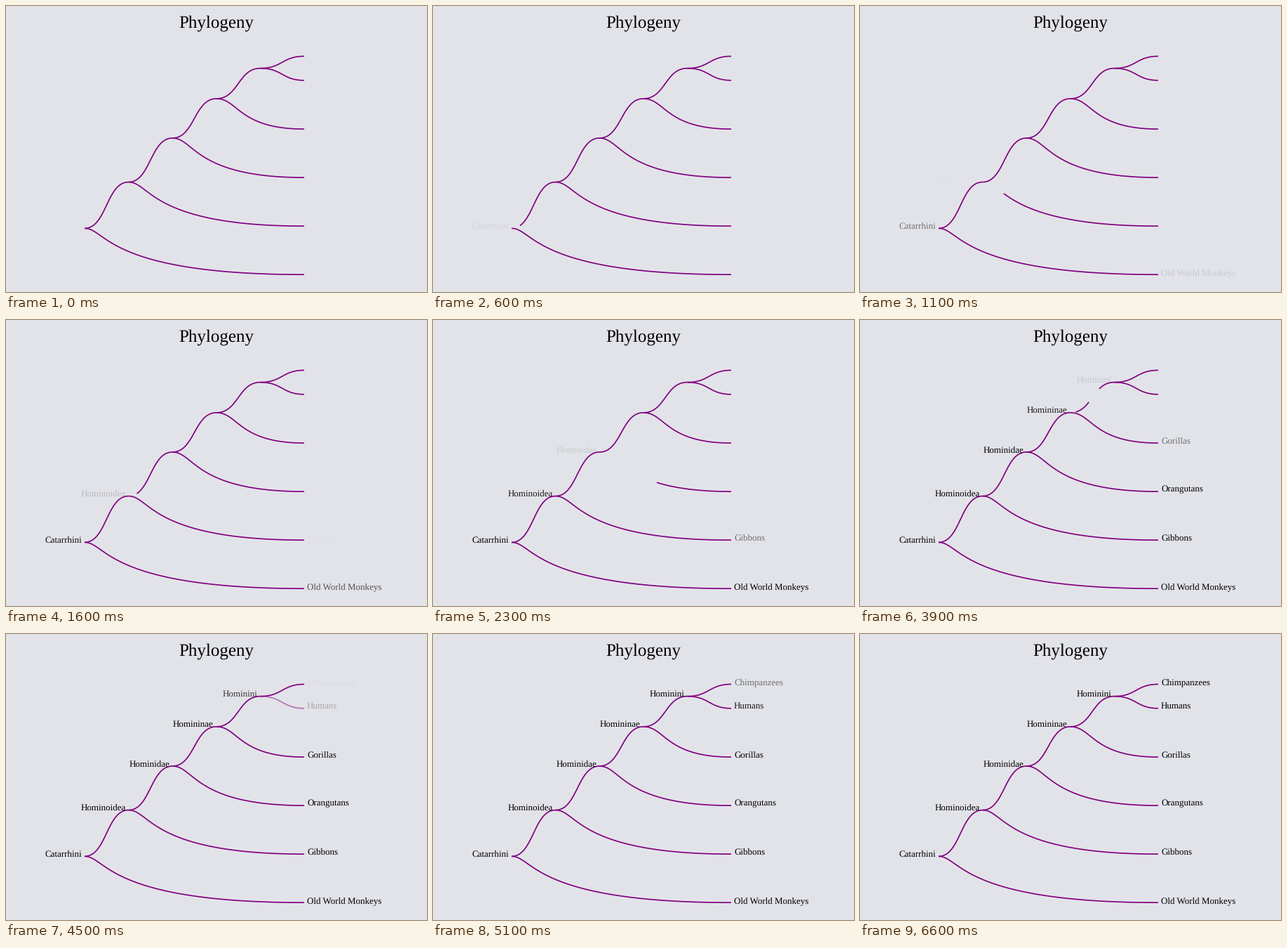
Recreate the animation shown at these times as a matplotlib script. Size 600x407 px, loop 6.7 s.

```python
import numpy as np
import matplotlib.pyplot as plt
from matplotlib.animation import FuncAnimation

W, H, DPI = 600, 407, 100
PX = 72 / DPI                       # points per pixel
STEP, FRAMES = 100, 67              # ms per frame, frames per loop
LINK_TIME = 500                     # each link redraws in turn
FADE_START, FADE_GAP, FADE_TIME = 100, 400, 2000
LEVEL = 62.6                        # horizontal distance between levels

plt.rcParams.update({
    "font.family": "Liberation Serif",
    "text.hinting": "none",
    "lines.scale_dashes": False,
    "path.simplify": False,
})

CLADES = ["Catarrhini", "Hominoidea", "Hominidae", "Homininae", "Hominini"]
TIPS = ["Old World Monkeys", "Gibbons", "Orangutans", "Gorillas", "Humans",
        "Chimpanzees"]
TIP_X = 425
TIP_Y = [382.2, 313.2, 244.1, 175.1, 105.8, 71.5]


def cubic_in_out(p):
    p = np.clip(p, 0, 1)
    return 4 * p**3 if p < 0.5 else 1 - 4 * (1 - p)**3


def link_points(parent, child):
    """Bezier from child to parent, both handles half a level past the parent."""
    t = np.linspace(1, 0, 160)
    (x0, y0), (x1, y1) = parent, child
    x = x0 + 1.5 * LEVEL * t * (1 - t) + (x1 - x0) * t**3
    y = y0 + (y1 - y0) * t**2 * (3 - 2 * t)
    return x, y


# Each clade sits halfway between its own tip and the next clade.
clade_y = [TIP_Y[-1]]
for y in TIP_Y[-2::-1]:
    clade_y.insert(0, (clade_y[0] + y) / 2)
inner = [(112 + LEVEL * k, clade_y[k]) for k in range(len(CLADES))]
tips = [(TIP_X, y) for y in TIP_Y]

fig = plt.figure(figsize=(W / DPI, H / DPI), dpi=DPI, facecolor="#e2e3e8")
ax = fig.add_axes([0, 0, 1, 1])
ax.set_xlim(0, W)
ax.set_ylim(H, 0)
ax.axis("off")

ax.text(300, 31, "Phylogeny", size=25 * PX, ha="center", va="baseline")

links, labels = [], []


def add_link(parent, child):
    x, y = link_points(parent, child)
    line, = ax.plot(x, y, color="#800080", lw=1.7 * PX,
                    solid_capstyle="butt", dash_capstyle="butt")
    links.append((line, np.hypot(np.diff(x), np.diff(y)).sum()))


def add_label(node, name, dx, ha):
    labels.append(ax.text(node[0] + dx, node[1] + 0.5, name, size=13 * PX,
                          ha=ha, va="baseline"))


for k, clade in enumerate(CLADES):
    add_label(inner[k], clade, -4, "right")
    add_label(tips[k], TIPS[k], 4, "left")
    add_link(inner[k], tips[k])
    add_link(inner[k], inner[k + 1] if k + 1 < len(inner) else tips[-1])
add_label(tips[-1], TIPS[-1], 4, "left")


def draw(frame):
    now = frame * STEP
    for i, (line, length) in enumerate(links):
        p = now / LINK_TIME - i
        if 0 < p <= 1:
            # dash and gap shrink together from full length to nothing
            dash = max(length * (1 - 0.65 * p - 0.35 * p**3), 0.5) * PX
            line.set_linestyle((0, (dash, dash)))
        else:
            line.set_linestyle("-")
    for i, label in enumerate(labels):
        label.set_alpha(cubic_in_out((now - FADE_START - i * FADE_GAP) / FADE_TIME))
    return [line for line, _ in links] + labels


anim = FuncAnimation(fig, draw, frames=FRAMES, interval=STEP, repeat=True,
                     repeat_delay=0, blit=False)
plt.show()
```
